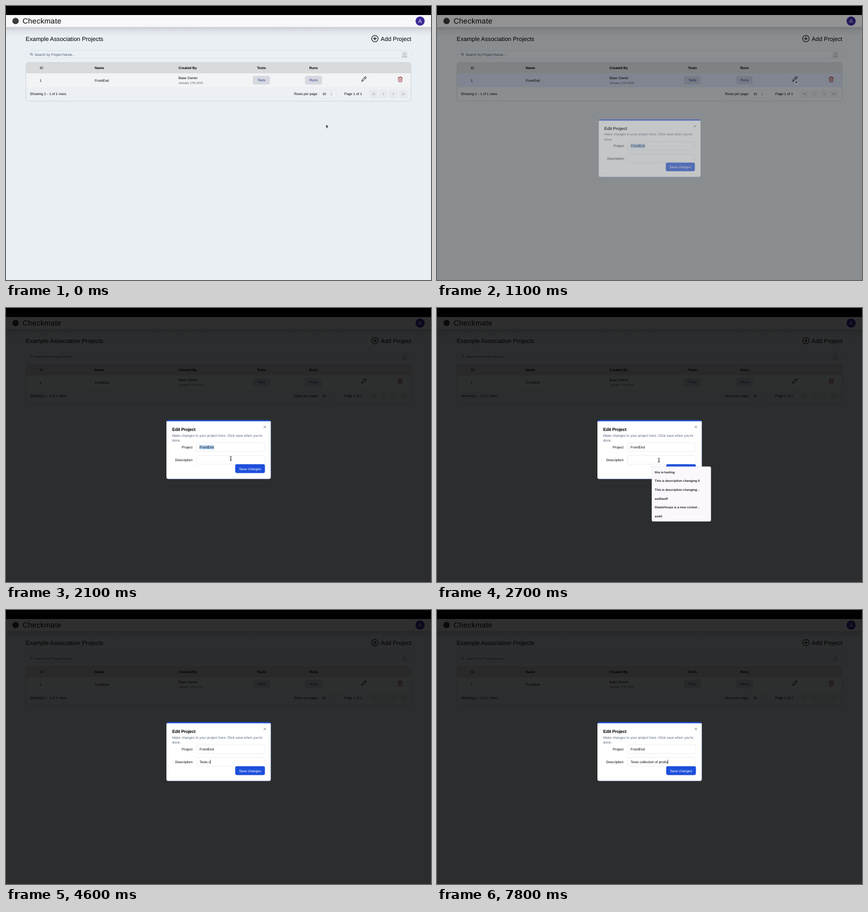
Recreate the animation shown at these times as an HTML page. Size 800 by 517 pixels, loop 8000 ms.

```html
<!DOCTYPE html>
<html lang="en">
<head>
<meta charset="utf-8">
<title>Edit project</title>
<style>
html, body { margin: 0; width: 100%; height: 100%; overflow: hidden; background: #eaeff4; }
svg { display: block; font: 6.5px "Liberation Sans", Arial, sans-serif; text-rendering: geometricPrecision; }
.b { font-weight: 700; }
.mid { text-anchor: middle; }
.end { text-anchor: end; }
.big { font-size: 11.15px; }
.icon { fill: none; stroke: #000; stroke-linecap: round; stroke-linejoin: round; }
.muted { fill: #56637a; }
.list { font: 600 5.85px Inter, "Liberation Sans", sans-serif; fill: #1c1a20; }
.field { fill: #fff; stroke: #e0e6ee; stroke-width: .7; }
#typed { white-space: pre; }

/* 1% = 80 ms */
.step, .move { animation: 8s infinite step-end; }
.move { animation-name: move; }
.arrow { animation-name: arrow; }
.hand { animation-name: hand; }
.beam { animation-name: beam; }
.hover { animation-name: hover; }
.scrim { animation-name: scrim; }
.dialog { animation-name: dialog; transform-origin: 400.25px 267px; }
.picked { animation-name: picked; }
.menu { animation-name: menu; }
.sheet { animation-name: sheet; }
.rest { animation-name: rest; }

@keyframes move {
  0% { transform: translate(602.5px, 223.5px); }
  1.5% { transform: translate(602.5px, 223.5px); animation-timing-function: ease-in-out; }
  11.2% { transform: translate(674.7px, 140.5px); }
  15.6% { transform: translate(674.7px, 140.5px); animation-timing-function: ease-in-out; }
  27.5%, 100% { transform: translate(417.6px, 287.2px); }
}
@keyframes arrow {
  0% { visibility: visible; }
  10.5% { visibility: hidden; }
  13.6% { visibility: visible; }
  23.6%, 100% { visibility: hidden; }
}
@keyframes hand {
  0% { visibility: hidden; }
  10.5% { visibility: visible; }
  13.6%, 100% { visibility: hidden; }
}
@keyframes beam {
  0% { visibility: hidden; }
  23.6% { visibility: visible; }
  36.1%, 100% { visibility: hidden; }
}
@keyframes hover {
  0% { visibility: hidden; }
  8.6% { visibility: visible; }
  14.85%, 100% { visibility: hidden; }
}
@keyframes scrim {
  0% { opacity: 0; }
  13.6% { opacity: .51; }
  14.85%, 100% { opacity: 1; }
}
@keyframes dialog {
  0% { opacity: 0; transform: none; }
  13.6% { opacity: .5; transform: translateY(1.3px) scale(.977); }
  14.85%, 100% { opacity: 1; transform: none; }
}
@keyframes picked {
  0% { visibility: visible; }
  30%, 100% { visibility: hidden; }
}
@keyframes menu {
  0% { opacity: 0; }
  31.1% { opacity: 1; }
  41.1%, 100% { opacity: 0; }
}
@keyframes sheet {
  0% { height: 103.5px; }
  36.1%, 100% { height: 53.5px; }
}
@keyframes rest {
  0% { visibility: visible; }
  36.1%, 100% { visibility: hidden; }
}
</style>
</head>
<body>
<svg width="800" height="517" viewBox="0 0 800 517">
  <defs>
    <linearGradient id="shade" x2="0" y2="1">
      <stop stop-opacity=".15"/>
      <stop offset=".45" stop-opacity=".05"/>
      <stop offset="1" stop-opacity="0"/>
    </linearGradient>
    <clipPath id="card"><rect x="37.5" y="106.5" width="725" height="73" rx="5"/></clipPath>
  </defs>

  <rect width="800" height="517" fill="#eaeff4"/>
  <rect y="39.5" width="800" height="17" fill="url(#shade)"/>
  <rect y="17" width="800" height="22.5" fill="#f7f7f9"/>
  <rect width="800" height="17"/>
  <circle cx="18" cy="28.2" r="6" fill="#3c3c3c"/>
  <text x="31.2" y="33.3" font-size="13.94" letter-spacing=".3">Checkmate</text>
  <circle cx="779.5" cy="28.3" r="8.6" fill="#3b2a98"/>
  <text class="mid" x="779.5" y="32" font-size="10.2" fill="#e6e3f5">A</text>

  <text class="big" x="37" y="65.5">Example Association Projects</text>
  <g class="icon" stroke-width="1.1">
    <circle cx="694.4" cy="61.6" r="6.1"/>
    <path d="M691.4 61.6h6M694.4 58.6v6"/>
  </g>
  <text class="big" x="705.3" y="65.5">Add Project</text>

  <rect x="37.4" y="84.2" width="725.4" height="14" rx="5.5" fill="#ebf0f5" stroke="#dbe1e8" stroke-width=".8"/>
  <g class="icon" stroke-width=".7" style="stroke:#475569">
    <circle cx="47.4" cy="90.7" r="2"/>
    <path d="M48.9 92.2l1.7 1.7"/>
  </g>
  <text x="54" y="93.6" fill="#475569">Search by Project Name...</text>
  <rect x="745" y="86.6" width="10.4" height="9.4" rx="1" fill="#d9dce0"/>
  <path d="M745.2 96h10" stroke="#8b9098" stroke-width=".8"/>
  <text class="mid" x="750.2" y="93.3" font-size="5.6" font-style="italic" fill="#555">/</text>

  <g clip-path="url(#card)">
    <rect x="37" y="106" width="726" height="21" fill="#d9dadc"/>
    <rect x="37" y="127" width="726" height="26.3" fill="#f2f3f5"/>
    <rect class="step hover" x="37" y="127" width="726" height="26.3" fill="#d9e2f5"/>
    <rect x="37" y="153.3" width="726" height="27" fill="#eceff3"/>
  </g>
  <rect x="37.5" y="106.5" width="725" height="73" rx="5" fill="none" stroke="#cdd2d8" stroke-width=".9"/>

  <text x="63.5" y="119">ID</text>
  <g class="b">
    <text x="167" y="119">Name</text>
    <text x="324.8" y="119">Created By</text>
    <text class="mid" x="480.8" y="119">Tests</text>
    <text class="mid" x="578.8" y="119">Runs</text>
  </g>

  <text x="63.5" y="142.5">1</text>
  <text x="167" y="142.5">FrontEnd</text>
  <text x="324.8" y="138">Base Owner</text>
  <text x="324.8" y="147" font-size="5.57" fill="#525b68">January 17th 2025</text>
  <g fill="#d5d8de" stroke="#cbd2dc" stroke-width=".6">
    <rect x="465" y="132.2" width="31.4" height="15.6" rx="3.5"/>
    <rect x="563.1" y="132.2" width="31.4" height="15.6" rx="3.5"/>
  </g>
  <g class="step hover" fill="#c6cfe2" stroke="#d9e2f5" stroke-width="1">
    <rect x="465" y="132.2" width="31.4" height="15.6" rx="3.5"/>
    <rect x="563.1" y="132.2" width="31.4" height="15.6" rx="3.5"/>
  </g>
  <g class="mid" fill="#2f358f">
    <text x="480.8" y="142.3">Tests</text>
    <text x="578.8" y="142.3">Runs</text>
  </g>

  <circle class="step hand" cx="675.2" cy="140.8" r="14.2" fill="none" stroke="#15181f"/>
  <path class="icon" stroke-width=".95" d="M669.7 141.9l.8-2.9 5.2-5.3q1-.8 1.9 0t.1 2l-5.3 5.3zM674.5 134.9l2 2"/>
  <g class="icon" stroke-width=".95" style="stroke:#962f31">
    <path d="M737.8 135.4h8.6M740.4 135.2v-.9q0-.8.8-.8h1.8q.8 0 .8.8v.9M738.7 135.5l.3 6.6q.1 1.1 1.1 1.1h4q1 0 1.1-1.1l.3-6.6M741.1 137.7v3.2M743.1 137.7v3.2"/>
  </g>

  <text x="45" y="168.3">Showing 1 - 1 of 1 rows.</text>
  <text x="542.3" y="168.3">Rows per page</text>
  <rect x="589.6" y="158.7" width="31.5" height="14.8" rx="3" fill="#edf1f5" stroke="#dde2e8" stroke-width=".7"/>
  <text x="595.4" y="168.3">10</text>
  <path class="icon" stroke-width=".6" style="stroke:#777" d="M610.8 165l1.4-1.4 1.4 1.4M610.8 167.2l1.4 1.4 1.4-1.4"/>
  <text x="636.8" y="168.3">Page 1 of 1</text>
  <g fill="#e6e9ed" stroke="#dfe3e8" stroke-width=".6">
    <rect x="684.6" y="158.9" width="14.3" height="14.3" rx="3"/>
    <rect x="703.2" y="158.9" width="14.3" height="14.3" rx="3"/>
    <rect x="721.9" y="158.9" width="14.3" height="14.3" rx="3"/>
    <rect x="740.4" y="158.9" width="14.3" height="14.3" rx="3"/>
  </g>
  <path class="icon" stroke-width=".75" style="stroke:#858b94" d="M691.2 164.2l-1.8 1.9 1.8 1.9M694.4 164.2l-1.8 1.9 1.8 1.9M711.2 164.2l-1.8 1.9 1.8 1.9M728.2 164.2l1.8 1.9-1.8 1.9M745.1 164.2l1.8 1.9-1.8 1.9M748.3 164.2l1.8 1.9-1.8 1.9"/>

  <rect class="step scrim" width="800" height="517" fill-opacity=".81"/>

  <g class="step dialog">
    <rect x="302" y="211.5" width="196.4" height="111" rx="3.5" fill="#1d4fdb"/>
    <path d="M302 214.6q0-.9 1-.9h194.4q1 0 1 .9v104.4q0 3.5-3.5 3.5h-189.4q-3.5 0-3.5-3.5z" fill="#fff"/>
    <text class="b" x="312.7" y="231.6" font-size="8.36" letter-spacing="-.21">Edit Project</text>
    <path class="icon" stroke-width=".8" style="stroke:#555" d="M485.4 222.6l3.8 3.8M489.2 222.6l-3.8 3.8"/>
    <g class="muted">
      <text x="312.7" y="242.6">Make changes to your project here. Click save when you're</text>
      <text x="312.7" y="251.9">done.</text>
    </g>
    <text class="end" x="351" y="264.9">Project</text>
    <text class="end" x="351" y="288.9">Description</text>
    <rect class="field" x="358.5" y="254.2" width="128.8" height="16.6" rx="3"/>
    <rect class="field" x="358.5" y="278.2" width="128.8" height="16.6" rx="3"/>
    <g class="step picked"><rect x="364" y="258.6" width="27.4" height="8.2" fill="#b3d3f8"/></g>
    <text x="364.3" y="264.9">FrontEnd</text>
    <text id="typed" x="364.3" y="288.9"></text>
    <rect id="caret" y="282.6" width=".7" height="7.9" visibility="hidden"/>
    <rect x="431.4" y="294.8" width="56" height="16.6" rx="3.3" fill="#1d4fdb"/>
    <text class="mid" x="459.3" y="305.5" fill="#fff">Save changes</text>
  </g>

  <g class="step menu">
    <rect class="step sheet" x="404.3" y="299.2" width="111.4" height="103.5" rx="3" fill="#faf7fd" stroke="#d8d4de" stroke-width=".5"/>
    <g class="list">
      <text x="409.8" y="311.6">this is testing</text>
      <text x="409.8" y="328.2">This is description changing it</text>
      <text x="409.8" y="344.9">This is description changing...</text>
      <g class="step rest">
        <text x="409.8" y="361.5">asdfasdf</text>
        <text x="409.8" y="378.2">GladeHoops is a new cricket...</text>
        <text x="409.8" y="394.8">asdd</text>
      </g>
    </g>
  </g>

  <g class="move">
    <path class="step arrow" d="M0 0v6.6l1.5-1.4 1 2.3 1.2-.5-1-2.3h2z" stroke="#fff" stroke-width=".6"/>
    <path class="step hand" d="M-.4.6q.7-.8 1.4 0l.9 2.6q.7-.5 1.2.2.8-.4 1.2.4.8-.2 1 .6l.3 2.2q0 1.2-.8 2.6h-3.6q-.9-1.5-2.4-2.8-.5-.9.4-1.1l1.3.5z" fill="#fff" stroke="#000" stroke-width=".6"/>
    <g class="step beam icon" stroke-width=".8">
      <path d="M-1.6-3.6q1.4 0 1.6.8.2-.8 1.6-.8M0-2.8v5.8M-1.6 3.8q1.4 0 1.6-.8.2.8 1.6.8M-.8.9h1.6"/>
    </g>
  </g>
</svg>
<script>
const LOOP = 8000, LEAD = 12;
const note = "Tests collection of produ";
const keyTimes = [
  2900, 3200, 3500, 3700, 4000, 4400, 4600, 4800, 5000, 5100, 5200, 5400, 5600,
  5700, 5900, 6100, 6200, 6500, 6600, 6700, 7000, 7200, 7300, 7600, 7800
];
const typed = document.getElementById("typed");
const caret = document.getElementById("caret");
let start, shown = -1;

function draw(now) {
  start ??= now;
  const time = (now - start + LEAD) % LOOP;
  const count = keyTimes.filter(k => k <= time).length;
  if (count !== shown) {
    shown = count;
    typed.textContent = note.slice(0, count);
    caret.setAttribute("x", 364.3 + typed.getComputedTextLength());
    caret.setAttribute("visibility", count ? "visible" : "hidden");
  }
  requestAnimationFrame(draw);
}
requestAnimationFrame(draw);
</script>
</body>
</html>
```
